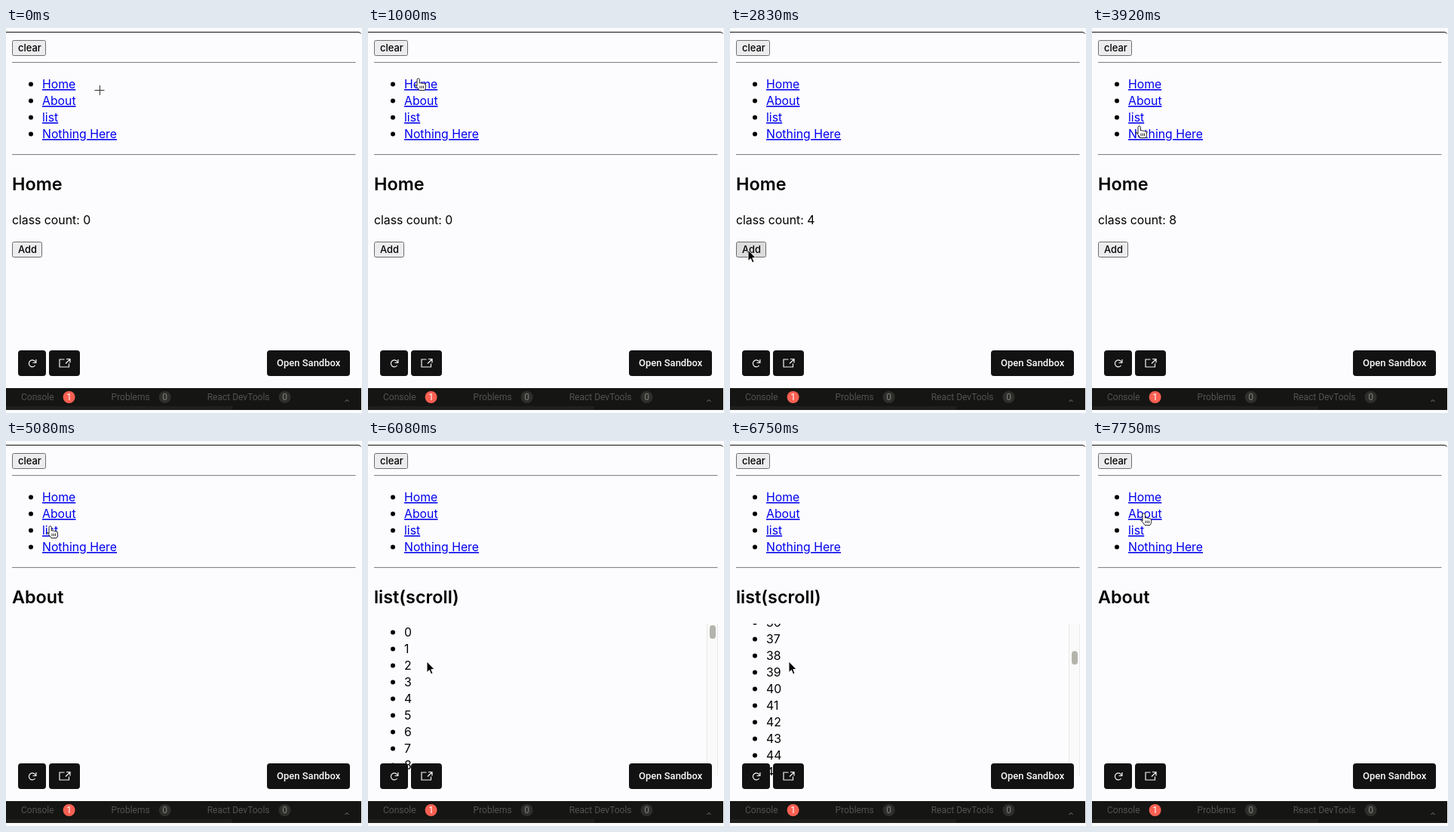
An HTML page that plays this animation: 472 by 510 pixels, repeating every 8 s.

```html
<!DOCTYPE html>
<html lang="en">
<head>
<meta charset="utf-8">
<title>Router demo</title>
<style>
  html, body { margin: 0; width: 100%; height: 100%; overflow: hidden; background: #fcfcfe; }
  svg { display: block; font: 15.8px Inter, sans-serif; fill: #000; }
  .link { fill: #0000ee; text-decoration: underline; }
  .title { font-size: 23.4px; font-weight: 600; }
  .label { font-size: 12.9px; font-weight: 500; }
  .button { fill: #ececee; stroke: #6c6c6c; }
  .dark { fill: #121212; }
  .icon { fill: none; stroke: #f4f4f4; stroke-width: 1.2; }
  .sandbox { font: 500 13px Roboto, sans-serif; fill: #fafafa; }
  .tab { font: 12px Roboto, sans-serif; fill: #535350; }
  .pointer { stroke-linejoin: round; }
</style>
</head>
<body>
<svg id="stage" width="472" height="510" viewBox="0 0 472 510"></svg>
<script>
const STEP = 1000 / 12, LOOP = 8000, ROW = 22;
const links = ["Home", "About", "list", "Nothing Here"];
const tabs = ["Console", "Problems", "React DevTools"];

// Pointer moves: first step, last step, destination
const origin = [124, 82];
const moves = [
  [0, 5, 126, 98], [8, 12, 67, 67], [14, 22, 41, 286], [24, 26, 24, 294],
  [43, 51, 70, 99], [59, 63, 57, 116], [68, 70, 78, 292], [81, 90, 69, 96]
];

const ruler = document.createElement("canvas").getContext("2d");
function measure(font, value) {
  ruler.font = font;
  return ruler.measureText(value).width;
}

const text = (x, y, value, cls = "") => `<text x="${x}" y="${y}" class="${cls}">${value}</text>`;
const rect = (x, y, w, h, attrs = "") => `<rect x="${x}" y="${y}" width="${w}" height="${h}" ${attrs}/>`;
const rule = y => rect(8, y, 455.5, 1, 'fill="#858585"') + rect(8, y + 1, 455.5, 1, 'fill="#eeeeee"');
const button = (y, w, label, id) =>
  rect(8.5, y + .5, w - 1, 20, `rx="2" class="button" id="${id}"`) + text(16, y + 15, label, "label");
const panel = (x, w) => rect(x, 427, w, 34, 'rx="4" class="dark"');
const bullets = (top, items, cls) => items.map((item, i) =>
  `<circle cx="33" cy="${top + 11.5 + ROW * i}" r="3"/>` + text(48, top + 17 + ROW * i, item, cls)).join("");

let tabX = 20;
const tabBar = tabs.map((name, i) => {
  const x = tabX, badge = x + measure("12px Roboto, sans-serif", name) + 20;
  tabX = badge + 56;
  return text(x, 493, name, "tab") +
    `<circle cx="${badge}" cy="489" r="8" fill="${i ? "#2e2e2c" : "#fa6052"}"/>` +
    `<text x="${badge}" y="493" text-anchor="middle" class="tab" style="fill:${i ? "#808078" : "#fff"}">${i ? 0 : 1}</text>`;
}).join("");

document.getElementById("stage").innerHTML = `
  <clipPath id="view">${rect(8, 242, 456, 201)}</clipPath>
  <path d="M0 5.5H467Q469.5 5.5 470.5 7.5" fill="none" stroke="#111"/>
  ${button(16, 45, "clear", "clear")}${rule(45)}${bullets(63, links, "link")}${rule(167)}
  <g id="home">${text(8, 214.5, "Home", "title")}
    <text id="count" x="8" y="259.6"></text>${button(283, 40, "Add", "add")}</g>
  <g id="about">${text(8, 214.5, "About", "title")}</g>
  <g id="list">${text(8, 214.5, "list(scroll)", "title")}
    <g clip-path="url(#view)"><g id="rows">${bullets(242, [...Array(200).keys()])}</g>
      ${rect(449, 242, 15, 201, 'fill="#fafafa"')}
      <path d="M449.5 242V443M463.5 242V443" stroke="#e8e8e8"/>
      ${rect(453, 244, 8, 18, 'id="thumb" rx="4" fill="#b4b4ac"')}</g></g>
  ${panel(16, 37)}${panel(57, 41)}${panel(346, 110)}
  <path class="icon" d="M39 442.5A4.5 4.5 0 1 0 38.6 447M39.9 439V443.5H35.5"/>
  <path class="icon" d="M77.5 439H71V449H83.5V444.5M80 438.5H85V443.5M85 438.5L79 444.5"/>
  ${text(359, 448, "Open Sandbox", "sandbox")}
  ${rect(0, 477, 471, 29, 'fill="#151513"')}${rect(0, 501, 300, 5, 'fill="#1f1f1d"')}
  ${tabBar}<path d="M449.5 495L452 492.5L454.5 495" fill="none" stroke="#808078"/>
  <g id="pointer" class="pointer">
    <path id="cross" d="M-6.5 .5H6.5M.5 -6V7" stroke="#333"/>
    <path id="arrow" d="M0 0V14.6L3.4 11.5L5.6 16.8L8 15.8L5.8 10.6H10.2Z" stroke="#fff"/>
    <g id="hand" fill="#fff" stroke="#222">
      <path d="M-2 9.5V1.5a1.7 1.7 0 0 1 3.4 0V6q2-1 3 .4q2-.8 2.8 .5q2.3-.5 2.3 1.6v3q0 2-1.5 4H1q-2-3.5-5.5-6.5q0-2.5 2.5 1z"/>
      <path d="M2 9.5V13M4.3 9.5V13M6.6 9.5V13"/></g>
  </g>`;

const el = Object.fromEntries([...document.querySelectorAll("[id]")].map(node => [node.id, node]));
const linkWidths = links.map(name => measure("15.8px Inter, sans-serif", name));
const show = (names, active) => names.forEach(name => el[name].style.display = name === active ? "" : "none");
const clamp = (v, lo, hi) => Math.min(hi, Math.max(lo, v));
const progress = (step, from, to) => clamp((step - from) / (to - from), 0, 1);
const easeOut = u => 1 - (1 - u) ** 2.65;
const smooth = u => u * u * u * (u * (6 * u - 15) + 10);

const pointerAt = step => moves.reduce(([x, y], [from, to, toX, toY]) => {
  const u = easeOut(progress(step, from, to));
  return [x + (toX - x) * u, y + (toY - y) * u];
}, origin).map(Math.round);

function draw(time) {
  const step = Math.floor((time % LOOP + 4) / STEP) % 96;
  const page = step < 55 ? "home" : step < 66 || step >= 93 ? "about" : "list";
  show(["home", "about", "list"], page);

  el.count.textContent = "class count: " + clamp(Math.floor((step - 26) / 2), 0, 8);
  const scroll = 814.5 * smooth(progress(step, 73, 82));
  el.rows.setAttribute("transform", `translate(0 ${-Math.round(scroll)})`);
  el.thumb.setAttribute("y", 244 + scroll * 179 / 4200);

  const [x, y] = pointerAt(step);
  const onLink = x >= 48 && x <= 48 + linkWidths[Math.floor((y - 63) / ROW)];
  const onAdd = x >= 8 && x <= 48 && y >= 283 && y <= 304;
  const pressed = step > 30 && step < 38 && step % 2;
  el.add.style.fill = onAdd ? (pressed ? "#f5f5f5" : "#dcdcdc") : "";
  show(["cross", "arrow", "hand"], step < 5 ? "cross" : onLink ? "hand" : "arrow");
  el.pointer.setAttribute("transform", `translate(${x} ${y})`);
}

const start = performance.now();
function tick() {
  draw(performance.now() - start);
  requestAnimationFrame(tick);
}
tick();
</script>
</body>
</html>
```
